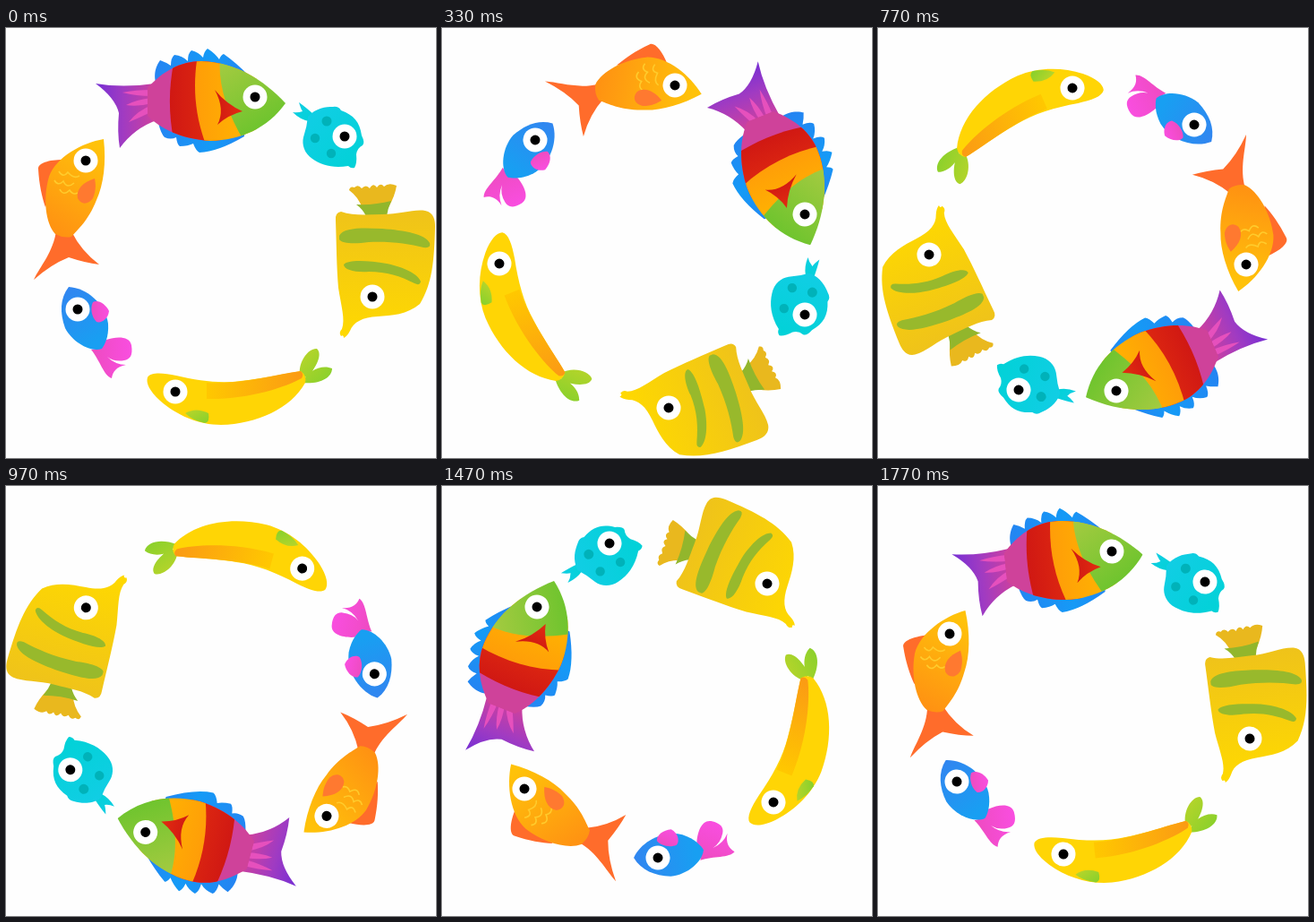
Write an HTML page that moves like this. It is 480 px wide and 480 px high and loops after 1810 ms.

```html
<!DOCTYPE html>
<html lang="en">
<head>
<meta charset="utf-8">
<title>Ring of fish</title>
<style>
html, body { margin: 0; width: 100%; height: 100%; overflow: hidden; background: #fefefe; }
svg { display: block; width: 100vw; height: 100vh; }
</style>
</head>
<body>
<svg viewBox="0 0 480 480">
<defs>
  <linearGradient id="fin"><stop stop-color="#2484f2"/><stop offset=".6" stop-color="#159af6"/><stop offset="1" stop-color="#2484f2"/></linearGradient>
  <linearGradient id="purple"><stop stop-color="#762fd4"/><stop offset=".45" stop-color="#a03bc2"/><stop offset="1" stop-color="#d0419c"/></linearGradient>
  <linearGradient id="red"><stop stop-color="#d01813"/><stop offset="1" stop-color="#e22d10"/></linearGradient>
  <linearGradient id="amber"><stop stop-color="#ff9d08"/><stop offset="1" stop-color="#ffb800"/></linearGradient>
  <linearGradient id="green" x1="0" y1="0" x2=".5" y2="1"><stop stop-color="#a9cb42"/><stop offset="1" stop-color="#66c32b"/></linearGradient>
  <linearGradient id="gold" x1=".7" y1="0" x2=".3" y2="1"><stop stop-color="#ffc20a"/><stop offset="1" stop-color="#ff9212"/></linearGradient>
  <linearGradient id="blue" x1="0" y1="0" x2=".5" y2="1"><stop stop-color="#3384f0"/><stop offset="1" stop-color="#189ff2"/></linearGradient>
  <linearGradient id="pink"><stop stop-color="#ee4bc0"/><stop offset="1" stop-color="#f94ee0"/></linearGradient>
  <linearGradient id="cyan" x2="1" y2="1"><stop stop-color="#13cde6"/><stop offset="1" stop-color="#00d2d6"/></linearGradient>
  <linearGradient id="yellow" x2="0" y2="1"><stop stop-color="#efc31a"/><stop offset="1" stop-color="#ffd900"/></linearGradient>
  <linearGradient id="peel"><stop stop-color="#ffc800"/><stop offset="1" stop-color="#fb9a14"/></linearGradient>
  <linearGradient id="leaf" x2="1" y2="1"><stop stop-color="#bcd52a"/><stop offset="1" stop-color="#84d02c"/></linearGradient>
  <clipPath id="body"><path d="M158 67C175 48 195 37 218 37C255 38 287 57 312 84C292 112 262 125 228 126C195 124 172 112 158 98Z"/></clipPath>
</defs>

<g id="rainbow">
  <path fill="url(#fin)" d="M168 64C163 49 170 39 172 36Q178 38 184 42Q184 33 188 30Q197 31 203 37Q203 28 207 25Q215 27 220 33Q221 26 225 23Q233 28 238 35Q240 30 243 29Q256 38 272 54L266 121Q237 138 216 139Q212 137 209 129Q203 132 194 132Q191 130 190 122Q184 125 177 122Q173 118 170 106Z"/>
  <path fill="url(#purple)" d="M166 62Q130 67 100 62Q122 78 126 95Q124 116 127 134Q143 112 168 103Z"/>
  <path fill="#e650bd" d="M163 69Q145 69 130 72Q145 76 163 76ZM163 78Q145 80 134 86Q148 88 163 84ZM163 86Q147 92 137 105Q152 99 163 93Z"/>
  <g clip-path="url(#body)">
    <path fill="#cf429a" d="M150 30H230V130H150Z"/>
    <path fill="url(#red)" d="M189 30C181 65 181 95 188 130H240V30Z"/>
    <path fill="url(#amber)" d="M214 30C208 65 211 98 223 130H280V30Z"/>
    <path fill="url(#green)" d="M239 30C236 64 247 96 268 130H320V30Z"/>
  </g>
  <path fill="url(#red)" d="M233 69Q246 85 264 93Q248 97 236 108Q245 91 233 69Z"/>
</g>

<g id="cyan-fish">
  <path fill="url(#cyan)" d="M343 96Q334 88 327 83Q329 90 331 93Q326 95 320 94Q328 102 338 104Z"/>
  <path fill="url(#cyan)" d="M337 99C346 89 357 88 365 88Q371 87 374 92C388 97 395 105 397 120Q401 128 398 131Q392 134 391 141Q392 151 389 156Q385 157 382 154C365 157 352 153 342 146C333 140 330 130 332 122Q336 110 337 99Z"/>
  <g fill="#00b2b9"><circle cx="358" cy="104" r="5.5"/><circle cx="345" cy="123" r="5.2"/><circle cx="363" cy="140" r="5.2"/></g>
</g>

<g id="yellow-fish">
  <path fill="#e9b81e" d="M398 202Q394 189 383 181Q384 176 389 178Q393 174 397 179Q402 174 406 179Q410 172 414 178Q418 172 422 177Q427 172 436 176Q434 188 427 200Z"/>
  <path fill="#92b62c" d="M391 197Q411 198 430 193Q426 202 425 210H402Q398 202 391 197Z"/>
  <path fill="url(#yellow)" d="M374 205C388 210 405 208 420 208C440 208 455 202 468 204C478 206 479 215 479 222C478 260 476 285 462 308C448 320 430 321 415 322C398 323 388 328 384 338Q381 344 377 346Q377 342 374 344Q371 340 375 336C379 325 374 310 371 290C369 265 369 245 368 215Q367 206 374 205Z"/>
  <path fill="#98b92c" d="M372 232C376 222 400 223 420 224C445 226 468 230 473 240Q475 246 466 245C450 241 430 238 405 239C390 241 375 241 372 236ZM377 264C383 258 405 260 425 263C445 267 460 275 463 283Q462 288 456 285C440 277 425 272 405 272C390 273 377 270 377 264Z"/>
</g>

<g id="banana">
  <path fill="url(#leaf)" d="M328 388C326 372 338 357 347 358C354 364 346 380 336 390ZM331 396C336 382 353 375 364 380C364 391 349 398 331 396Z"/>
  <path fill="#ffd505" d="M158 390C162 384 175 385 190 388C215 394 240 397 262 394C290 391 315 385 329 383Q336 388 334 396C318 425 280 442 240 443C215 443 190 432 172 416C160 405 156 396 158 390Z"/>
  <path fill="url(#peel)" d="M224 396C262 398 300 387 329 383Q333 386 330 391C312 401 270 415 224 414Z"/>
  <path fill="url(#leaf)" d="M200 430Q212 423 226 430Q228 440 222 441Q208 438 200 430Z"/>
</g>

<g id="blue-fish">
  <path fill="url(#pink)" d="M95 359Q107 358 112 348C124 344 138 344 140 354C142 366 138 370 132 371Q121 373 113 367Q122 376 134 376C123 378 119 384 118 391C109 388 105 371 95 359Z"/>
  <path fill="url(#blue)" d="M70 289C90 290 111 308 114 330C115 345 110 354 107 358C95 362 75 352 66 335C60 318 60 302 70 289Z"/>
  <path fill="url(#pink)" d="M97 306C103 303 111 308 115 316C114 325 106 330 101 328C95 322 94 312 97 306Z"/>
</g>

<g id="orange-fish">
  <path fill="#ff6c2b" d="M64 147C47 147 36 151 36 157C37 175 40 188 44 200ZM56 226C53 250 38 266 31 281Q50 264 70 256Q88 262 104 264Q84 249 73 227Z"/>
  <path fill="url(#gold)" d="M109 124C112 150 109 175 101 192C92 215 80 225 73 233Q64 235 55 230C44 218 41 190 48 166C56 144 85 128 109 124Z"/>
  <path fill="none" stroke="#ffcb2c" stroke-width="1.6" d="M59 160Q64 168 69 161Q76 169 82 165M54 170Q58 177 64 171Q68 180 76 173M60 180Q64 188 71 181Q75 187 80 184"/>
  <path fill="#ff7930" d="M99 168C86 172 78 180 80 190C84 198 92 197 97 190C101 180 100 174 99 168Z"/>
</g>
</svg>
<script>
const LOOP = 1810, STEP = 100 / 3, STEPS = 54, CX = 239, CY = 240;
const keys = [0, 10, 17, 23, 35, 44, 53, 54];
const tilts = [0, 1.5, -3.5, 3.1, 0, -1.6, 0.8, 0];

// Eye positions (x, y) at each key step; the last key closes the loop.
const paths = {
  'rainbow': [278, 77, 405, 208, 367, 342, 266, 405, 81, 302, 106, 135, 261, 73],
  'cyan-fish': [378, 121, 405, 320, 288, 412, 157, 404, 60, 195, 187, 64, 365, 107],
  'yellow-fish': [409, 300, 253, 424, 116, 368, 57, 253, 188, 65, 363, 109, 415, 282],
  'banana': [189, 406, 64, 263, 109, 128, 217, 67, 403, 183, 370, 353, 207, 411],
  'blue-fish': [80, 314, 104, 125, 236, 67, 353, 108, 392, 326, 241, 415, 88, 330],
  'orange-fish': [89, 148, 260, 64, 380, 143, 411, 264, 250, 416, 92, 338, 80, 165]
};

const turn = step => step * 2 * Math.PI / STEPS;
const wrap = a => Math.atan2(Math.sin(a), Math.cos(a));

function sample(values, step) {
  let i = 0;
  while (step >= keys[i + 1] && i < keys.length - 2) i++;
  const u = (step - keys[i]) / (keys[i + 1] - keys[i]);
  return values[i] + (values[i + 1] - values[i]) * u;
}

function dot(parent, x, y, r, fill) {
  const c = document.createElementNS('http://www.w3.org/2000/svg', 'circle');
  Object.entries({ cx: x, cy: y, r, fill }).forEach(([k, v]) => c.setAttribute(k, v));
  parent.append(c);
}

const school = Object.entries(paths).map(([id, path]) => {
  const node = document.getElementById(id), [x, y] = path;
  dot(node, x, y, 13.5, '#fff');
  dot(node, x, y, 5.5, '#000');
  const start = Math.atan2(y - CY, x - CX);
  const radii = [], drift = [];
  keys.forEach((key, i) => {
    const j = i % 7 * 2, dx = path[j] - CX, dy = path[j + 1] - CY;
    radii.push(Math.hypot(dx, dy));
    drift.push(wrap(Math.atan2(dy, dx) - start - turn(key)));
  });
  return { node, x, y, start, radii, drift };
});

function draw(ms) {
  const tick = Math.floor(ms / 10) * 10;
  const step = Math.min(STEPS - 1, Math.floor((tick + 5) / STEP));
  const angle = turn(step) * 180 / Math.PI + sample(tilts, step);
  for (const f of school) {
    const a = f.start + turn(step) + sample(f.drift, step), r = sample(f.radii, step);
    const px = CX + r * Math.cos(a), py = CY + r * Math.sin(a);
    f.node.setAttribute('transform', `translate(${px} ${py}) rotate(${angle}) translate(${-f.x} ${-f.y})`);
  }
}

const begin = performance.now();
function loop() {
  draw((performance.now() - begin) % LOOP);
  requestAnimationFrame(loop);
}
loop();
</script>
</body>
</html>
```
